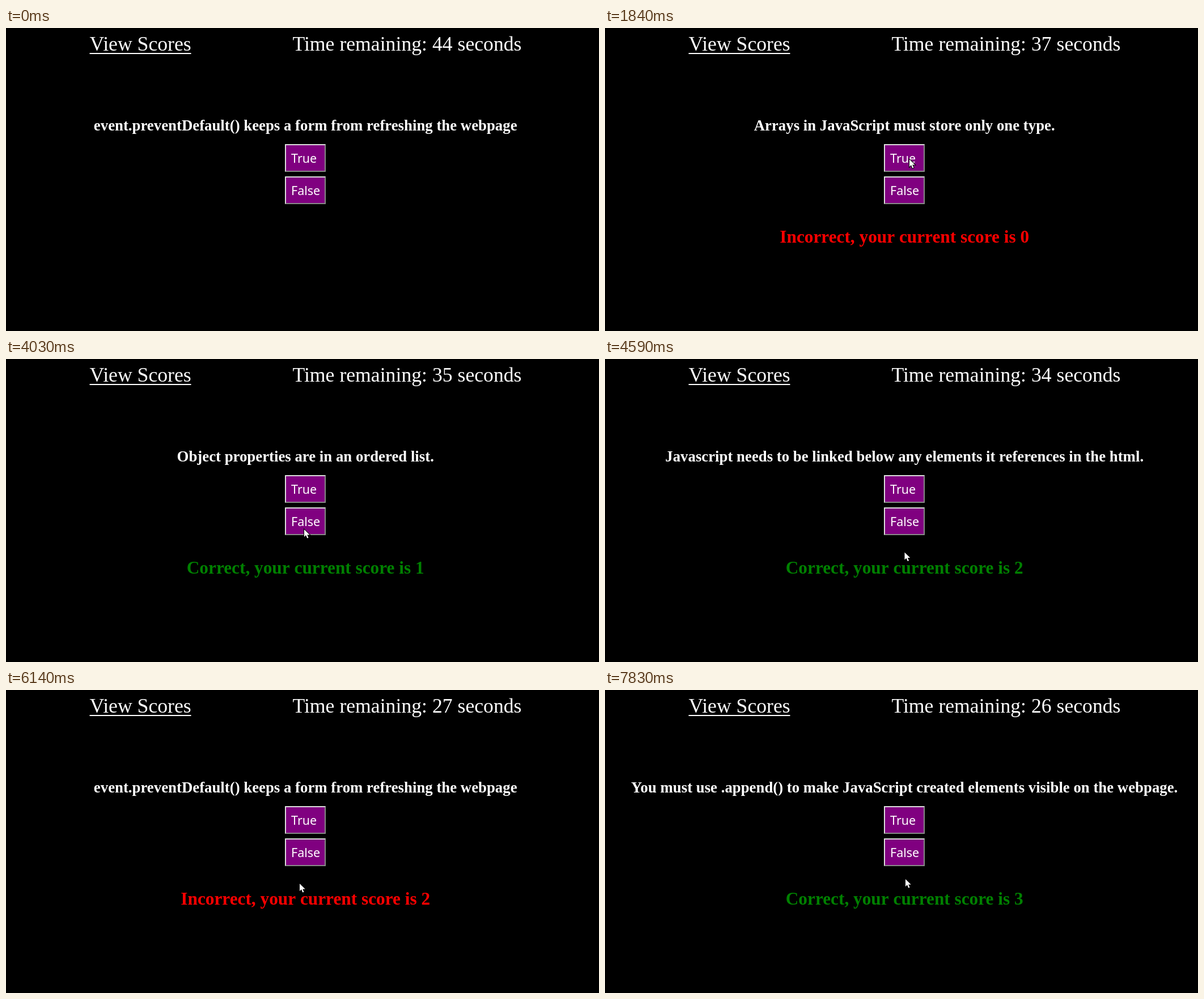
An HTML page with a canvas that plays this animation: 1046x535 px, repeating every 8000 ms.

```html
<!DOCTYPE html>
<html lang="en">
<head>
<meta charset="utf-8">
<title>Quiz</title>
<style>
  html, body { margin: 0; height: 100%; overflow: hidden; background: #000; }
  canvas { display: block; }
</style>
</head>
<body>
<canvas id="stage" width="1046" height="535"></canvas>
<script>
const ctx = document.getElementById('stage').getContext('2d');
const LOOP = 8000, MID = 528.2, HOLD = 100, GLIDE = 280;
const SECOND = 1012, PENALTY = 5;
const SERIF = '"Liberation Serif", "Times New Roman", serif';
const HEADER = `35.7px ${SERIF}`;
const FORM = 'event.preventDefault() keeps a form from refreshing the webpage';

// each question, the button pressed, whether it counts as right, and when
const rounds = [
  { question: FORM, press: 'True', right: false, at: 1100 },
  { question: 'Arrays in JavaScript must store only one type.', press: 'True', right: true, at: 2710 },
  { question: 'Object properties are in an ordered list.', press: 'False', right: true, at: 4240 },
  { question: 'Javascript needs to be linked below any elements it references in the html.', press: 'False', right: false, at: 5730 },
  { question: FORM, press: 'True', right: true, at: 7150 },
  { question: 'You must use .append() to make JavaScript created elements visible on the webpage.', at: Infinity }
];

// pointer stops: arrival time, x, y
const stops = [
  [70, 896, 487], [350, 514, 302], [690, 541, 235], [1840, 537, 232],
  [3060, 521, 264], [4030, 526, 301], [4450, 530, 346], [4660, 528, 340],
  [5330, 523, 295], [6070, 518, 342], [6750, 534, 237], [7360, 530, 346], [7830, 530, 334]
];

const arrow = new Path2D('M0 0V13L3 10L5.3 15.5L7.5 14.5L5.2 9.4H9.7Z');

function text(str, x, y, font, color = '#fff', align = 'left') {
  ctx.font = font;
  ctx.fillStyle = color;
  ctx.textAlign = align;
  ctx.fillText(str, x, y);
}

function polygon(color, ...points) {
  ctx.fillStyle = color;
  ctx.beginPath();
  points.forEach(([x, y]) => ctx.lineTo(x, y));
  ctx.fill();
}

function button(label, y, pressed) {
  const l = 492, r = 564, b = y + 49;
  const [top, bottom] = pressed ? ['#898989', '#ddd'] : ['#ddd', '#898989'];
  ctx.fillStyle = bottom;
  ctx.fillRect(l, y, r - l, b - y);
  polygon(top, [l, y], [r, y], [r - 2, y + 2], [l + 2, y + 2], [l + 2, b - 2], [l, b]);
  ctx.fillStyle = '#800080';
  ctx.fillRect(l + 2, y + 2, r - l - 4, b - y - 4);
  text(label, 503, y + 33, '21.5px "Noto Sans", sans-serif');
}

// wait at each stop, then glide to arrive at the next one on time
function pointerAt(t) {
  const next = stops.findIndex(([end]) => end > t);
  if (next === 0) return null;
  if (next < 0) return stops.at(-1).slice(1);
  const [from, x0, y0] = stops[next - 1], [end, x1, y1] = stops[next];
  const start = Math.max(from, end - GLIDE);
  const p = Math.max(0, (t - start) / (end - start)), ease = p * p * (3 - 2 * p);
  return [x0 + (x1 - x0) * ease, y0 + (y1 - y0) * ease];
}

function drawPointer(t, pressed) {
  const tip = pointerAt(t);
  if (!tip) return;
  ctx.save();
  ctx.translate(...tip);
  ctx.lineWidth = 2;
  ctx.strokeStyle = '#000';
  ctx.stroke(arrow);
  ctx.fillStyle = '#fff';
  ctx.fill(arrow);
  if (pressed) {
    ctx.fillStyle = 'rgba(255, 255, 0, .5)';
    ctx.beginPath();
    ctx.arc(0, 0, 11, 0, 2 * Math.PI);
    ctx.fill();
  }
  ctx.restore();
}

function draw() {
  const t = performance.now() % LOOP;
  const done = rounds.filter(round => round.at <= t);
  const { question, press, at } = rounds[done.length];
  const pressed = t >= at - HOLD && press;
  const score = done.filter(round => round.right).length;
  const ticks = Math.floor((t + 965) / SECOND);
  const seconds = 44 - ticks - PENALTY * (done.length - score);

  ctx.fillStyle = '#000';
  ctx.fillRect(0, 0, 1046, 535);

  text('View Scores', 147.5, 40, HEADER);
  ctx.fillRect(147.5, 44, 179, 2);
  text(`Time remaining: ${seconds} seconds`, 505.4, 40, HEADER);
  text(question, MID, 181, `bold 26.8px ${SERIF}`, '#fff', 'center');
  button('True', 205, pressed === 'True');
  button('False', 262, pressed === 'False');
  if (done.length) {
    const [verdict, color] = done.at(-1).right ? ['Correct', '#008000'] : ['Incorrect', '#f00'];
    text(`${verdict}, your current score is ${score}`, MID, 379, `bold 31.3px ${SERIF}`, color, 'center');
  }
  drawPointer(t, pressed);
  requestAnimationFrame(draw);
}
draw();
</script>
</body>
</html>
```
